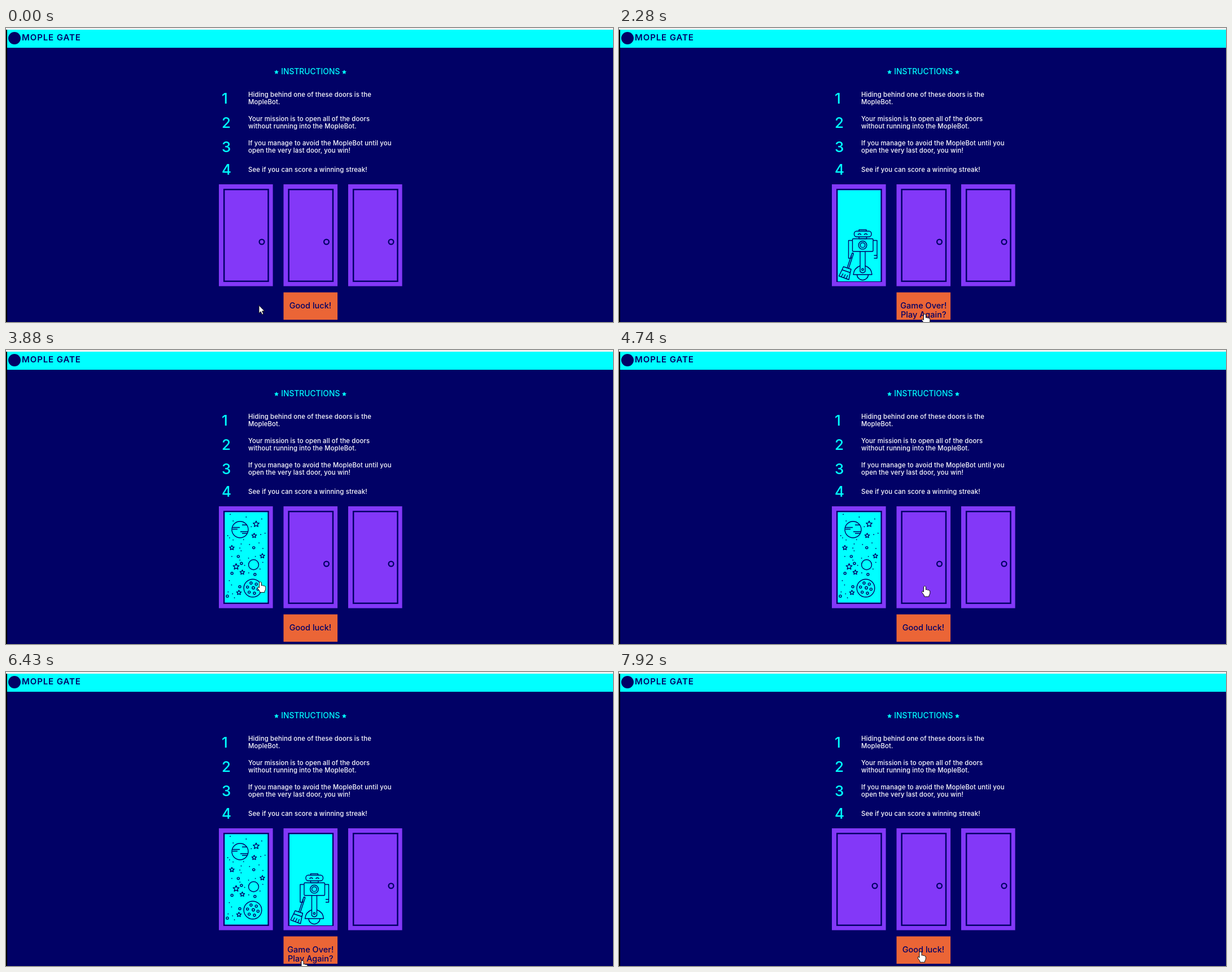
Animation, 1075 px wide and 521 px high, one loop 8 s. Source, as an HTML page:

```html
<!DOCTYPE html>
<html lang="en">
<head>
<meta charset="utf-8">
<title>Mople Gate</title>
<style>
  html, body { margin: 0; width: 100%; height: 100%; overflow: hidden; background: #010166; }
  svg { display: block; width: 1075px; height: 521px; font-family: Inter, "Open Sans", sans-serif; }
  .line { fill: none; stroke: #010166; stroke-width: 1.4; stroke-linejoin: round; }
  .frame { stroke-width: 2.5; stroke-linejoin: miter; }
  .rule { font-size: 11.35px; font-weight: 500; letter-spacing: .14px; fill: #fff; }
  .num { font-size: 26px; font-weight: 500; fill: #0ff; }
  .button { font-size: 14.5px; font-weight: 500; fill: #010166; text-anchor: middle; }
  .cursor { fill: #fff; stroke: #111; stroke-linejoin: round; }
</style>
</head>
<body>
<svg viewBox="0 0 1075 521">
  <defs>
    <circle id="closed" class="line" cx="453" cy="379" r="4.4" style="stroke-width:2.3"/>
    <g id="robot">
      <rect x="387.5" y="287.5" width="75.8" height="161.5" fill="#0ff"/>
      <g class="line">
        <path d="M425 360V357.5H438V360"/>
        <rect x="416.5" y="360" width="30.5" height="10" rx="4.5"/>
        <path d="M423 366.5Q426 362.5 429 366.5M434 366.5Q437 362.5 440 366.5M425 370V373.5H438.5V370"/>
        <rect x="413.5" y="373.5" width="36.5" height="22.5" rx="1.5"/>
        <circle cx="431.5" cy="384.8" r="7.3"/>
        <circle cx="431.5" cy="384.8" r="4.3"/>
        <path d="M413 376.5H406.5V408H411V403M450 376.5H457V408H451.5M451.5 403H457"/>
        <path d="M427 396V431.5Q431.5 436 436 431.5V396"/>
        <circle cx="431.5" cy="428" r="1.7"/>
        <path d="M427 421.5Q416.5 425 415 437H448Q447 425 436 421.5M421.5 437A10 9.7 0 0 0 441.5 437"/>
        <path d="M413 398.5L404 425.5M415.5 399.5L406.5 426.5M413 398.5L415.5 399.5"/>
        <path d="M397.5 423L411 427.5 409.5 433.5 395 428.5ZM395 428.5L389.5 439.5 407 446 409.5 433.5M393.5 441L397 435M398 442.5L401 436.5M402.5 444L405 438"/>
      </g>
    </g>
    <g id="space">
      <rect x="387.5" y="287.5" width="75.8" height="160" fill="#0ff"/>
      <path class="line" d="M400.5 314.5H414M401 317.5H410M418 310H427M415 322H428.500M418 325H427"/>
      <g id="sky"></g>
    </g>
    <path id="arrow" class="cursor" d="M0 0V14L3.2 11 5.500 16.2 7.9 15.2 5.7 10.2H10Z"/>
    <path id="hand" class="cursor" d="M-2 1.5Q0-1 2 1.5V7Q4 5.5 5 7.5 7 6 8 8.5 9.5 8 9.3 10V13Q9 15 7.5 17V19H-1V17L-5 11.5Q-5 8.8-3 9.5L-2 11Z"/>
  </defs>

  <rect width="1075" height="521" fill="#010166"/>
  <rect width="1075" height="3" fill="#f4f4f4"/>
  <rect y="3" width="1075" height="32" fill="#0ff"/>
  <rect y="3" width="2" height="518"/>
  <circle cx="15" cy="18" r="11" fill="#010166"/>
  <text x="28" y="21.5" font-size="15" font-weight="600" letter-spacing=".9" fill="#010166">MOPLE GATE</text>
  <g fill="#0ff">
    <text x="539.3" y="82.2" font-size="13.8" font-weight="500" text-anchor="middle">INSTRUCTIONS</text>
    <g id="titleStars"></g>
  </g>
  <g id="rules"></g>
  <g id="doors"></g>
  <rect x="491.5" y="468.5" width="95.6" height="48.5" fill="#eb6536"/>
  <g id="lucky" class="button"><text x="539" y="497">Good luck!</text></g>
  <g id="over" class="button">
    <text x="539.3" y="497">Game Over!</text>
    <text x="539.3" y="513.3">Play Again?</text>
  </g>
  <use id="cursor"/>
</svg>
<script>
const $ = id => document.getElementById(id);
const doorGap = 114.5, doorWidth = 95.6;

function star(x, y, r, attrs = "") {
  const points = Array.from({ length: 10 }, (_, i) => {
    const a = (i - 2.5) * Math.PI / 5, d = i % 2 ? r * 0.48 : r;
    return [x + d * Math.cos(a), y + d * Math.sin(a)];
  });
  return `<polygon ${attrs} points="${points.join(" ")}"/>`;
}
const ring = (x, y, r) => `<circle class="line" cx="${x}" cy="${y}" r="${r}"/>`;
const dot = (x, y) => `<circle cx="${x}" cy="${y}" r=".9" fill="#010166"/>`;

$("titleStars").innerHTML = star(479, 78.2, 4.3) + star(599, 78.2, 4.3);

// Each row is as tall as its text or number, with its content centred
const rules = [
  ["Hiding behind one of these doors is the", "MopleBot."],
  ["Your mission is to open all of the doors", "without running into the MopleBot."],
  ["If you manage to avoid the MopleBot until you", "open the very last door, you win!"],
  ["See if you can score a winning streak!"]
];
let rowTop = 103;
$("rules").innerHTML = rules.map((lines, i) => {
  const height = Math.max(20, lines.length * 13) + 17, mid = rowTop + height / 2;
  rowTop += height;
  return `<text class="num" x="382" y="${mid + 9}">${i + 1}</text>` + lines.map((s, k) =>
    `<text class="rule" x="429" y="${mid + 4 + 13 * (k - (lines.length - 1) / 2)}">${s}</text>`).join("");
}).join("");

// Space: planets and stars are placed, small rings and dust are scattered between them
const planets = [[414.5, 318.2, 14.5], [438.5, 380.5, 9], [437, 422, 15.8]];
const stars = [[443, 308.5], [439.5, 329], [400, 350.5], [454, 365], [407.5, 384], [418.5, 394], [412.5, 430]]
  .map(([x, y], i) => [x, y, i % 4 ? 4.3 : 5.5]);
const taken = [...planets, ...stars];
let seed = 7;
const random = () => (seed = seed * 16807 % 2147483647) / 2147483647;

function scatter(count, r, top, shape) {
  let out = "";
  while (count) {
    const x = 392 + 67 * random(), y = top + (444 - top) * random();
    if (taken.some(([px, py, pr]) => Math.hypot(x - px, y - py) < pr + r + 3)) continue;
    taken.push([x, y, r]);
    out += shape(x, y, r);
    count--;
  }
  return out;
}
let craters = ring(438, 421.5, 2.2);
for (let a = 0; a < 6; a++) craters += ring(437 + 9.5 * Math.cos(a * Math.PI / 3 + 0.2), 422 + 9.5 * Math.sin(a * Math.PI / 3 + 0.2), 2);
$("sky").innerHTML = planets.map(p => ring(...p)).join("") + craters +
  stars.map(s => star(...s, 'class="line"')).join("") +
  scatter(7, 2, 345, ring) + scatter(30, 0.9, 291, dot);

$("doors").innerHTML = [0, 1, 2].map(i => `
  <g transform="translate(${i * doorGap})">
    <rect x="377" y="277" width="${doorWidth}" height="180.5" fill="#8338f8"/>
    <rect class="line frame" x="386.2" y="286.2" width="78.3" height="162.6"/>
    <use id="door${i}"/>
  </g>`).join("");

// Start time, then what the first two doors show
const scenes = [
  [0, "closed", "closed"],
  [1020, "robot", "closed"],
  [2860, "closed", "closed"],
  [3880, "space", "closed"],
  [5040, "space", "robot"],
  [7050, "closed", "closed"]
];

// Pointer stops: start time, position, travel time
const stops = [
  [0, 448, 491.5, 0],
  [580, 437, 411.5, 160],
  [1730, 477.5, 481.5, 0],
  [1890, 527, 519, 0],
  [2040, 541.5, 506.5, 240],
  [3450, 450.5, 410.5, 280],
  [4620, 541.5, 418, 120],
  [5870, 473.5, 493, 280],
  [6300, 525, 511, 130],
  [7920, 534, 495.3, 0]
];

// The pointer speeds up along each leg and is redrawn only every 140 ms or so
function pointerAt(t) {
  const i = stops.findLastIndex(([start]) => start <= t);
  const [start, x, y, travel] = stops[i], [, fromX, fromY] = stops[Math.max(0, i - 1)];
  const jumps = Math.round(travel / 140);
  const done = jumps ? Math.min(jumps, Math.floor((t - start) / travel * jumps)) : 0;
  const p = ((done + 1) / (jumps + 1)) ** 1.5;
  return [fromX + (x - fromX) * p, fromY + (y - fromY) * p];
}

function isClickable(x, y) {
  const fromLeft = x - 377, column = Math.floor(fromLeft / doorGap);
  if (column < 0 || column > 2 || fromLeft % doorGap > doorWidth) return false;
  return y > 277 && y < 457.5 || column === 1 && y > 468 && y < 517;
}

function draw() {
  const t = performance.now() % 8000;
  const [, left, middle] = scenes.findLast(([start]) => start <= t);
  [left, middle, "closed"].forEach((name, i) => $("door" + i).setAttribute("href", "#" + name));
  const lost = left === "robot" || middle === "robot";
  $("over").style.display = lost ? "" : "none";
  $("lucky").style.display = lost ? "none" : "";
  const [x, y] = pointerAt(t);
  $("cursor").setAttribute("href", isClickable(x, y) ? "#hand" : "#arrow");
  $("cursor").setAttribute("transform", `translate(${x} ${y})`);
  requestAnimationFrame(draw);
}
draw();
</script>
</body>
</html>
```
